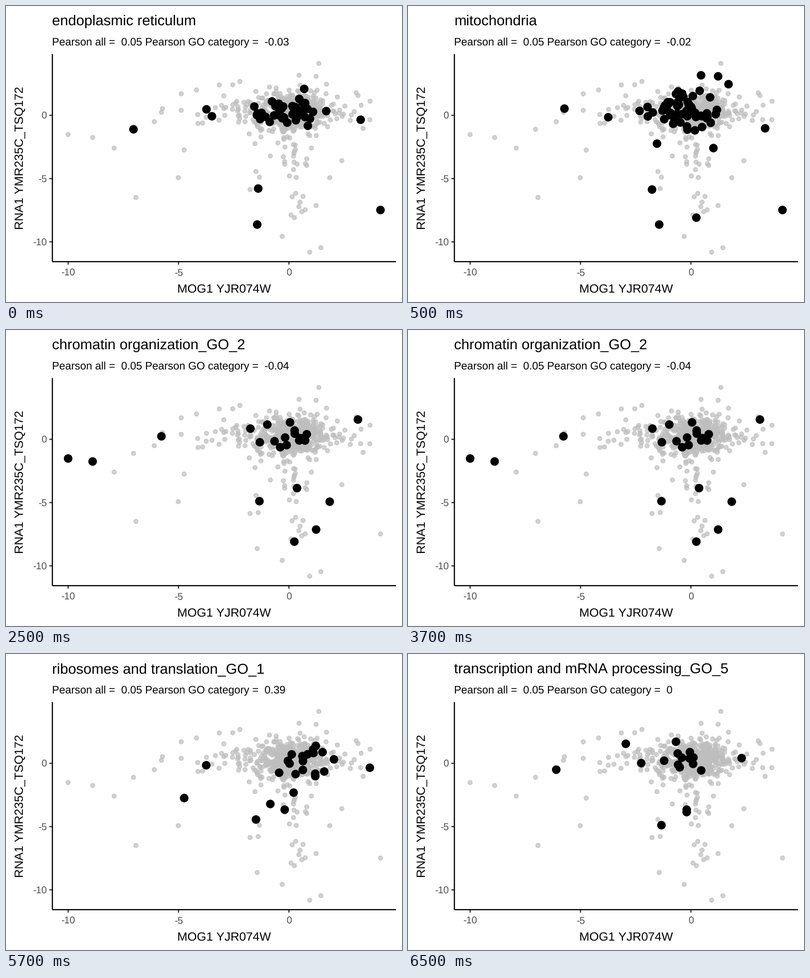
A matplotlib script that plays this animation: 800 px wide and 600 px high, repeating every 8 s.

```python
import numpy as np
import matplotlib.pyplot as plt
from matplotlib.animation import FuncAnimation

plt.rcParams.update({
    "font.family": "Liberation Sans",
    "text.hinting": "none",
    "text.kerning_factor": 6,  # in effect no kerning
})

DPI = 100
PX = 72 / DPI  # points per pixel
BASE = 24.5    # base font size in pixels
LINE = 2.37
LEFT, RIGHT, TOP, BOTTOM = 93.7, 787.8, 97.4, 518.2

rng = np.random.default_rng(11)


def blob(n, center, spread, reach=2.2):
    """n normally scattered points, none further out than reach deviations."""
    z = rng.normal(size=(4 * n, 2))
    z = z[np.hypot(*z.T) < reach][:n]
    return center + z * spread


def strip(n, x_range, center, spread):
    """n points spread evenly in x and normally in y."""
    return np.column_stack([rng.uniform(*x_range, n),
                            rng.normal(center, spread, n)])


def genes(key_points, *groups):
    return np.vstack([key_points, *groups])


# Lone genes are placed by hand (stage pixels), crowded ones scattered.
reticulum = genes(
    [(257.5, 250), (405, 209.5), (416, 223.5), (716.5, 230.5), (647, 213),
     (509.5, 370), (507.5, 443), (756.5, 413.5), (602.5, 168)],
    blob(42, (567, 216), (34, 15)))
mitochondria = genes(
    [(316, 208), (404.5, 225.5), (592, 140.5), (626.5, 142.5),
     (647.5, 158.5), (617, 288), (721.5, 248), (493, 372), (507.5, 443),
     (582.5, 429), (756.5, 413.5), (503, 279)],
    blob(58, (549, 213), (43, 24)))
chromatin = genes(
    [(125.5, 260.5), (175, 266.5), (314, 215.5), (711, 181.5), (588, 320.5),
     (512, 347), (654, 348), (626.5, 404.5), (582.5, 429)],
    blob(14, (560, 214), (50, 20)))
ribosomes = genes(
    [(360, 292), (404.5, 225.5), (735, 230.5), (534, 304), (563, 315.5),
     (505, 335.5), (581, 281), (662.5, 213.5)],
    blob(17, (597, 221), (32, 22)))
transcription = genes(
    [(299.5, 234.5), (440, 182), (674, 211), (563, 315.5), (563, 320.5),
     (512, 347)],
    blob(12, (560, 212), (42, 19)))

CATEGORIES = [
    ("endoplasmic reticulum", "-0.03", reticulum),
    ("mitochondria", "-0.02", mitochondria),
    ("chromatin organization_GO_2", "-0.04", chromatin),
    ("ribosomes and translation_GO_1", "0.39", ribosomes),
    ("transcription and mRNA processing_GO_5", "0", transcription),
]

highlighted = np.unique(np.vstack([c[2] for c in CATEGORIES]), axis=0)
all_genes = genes(
    [(218.5, 288), (262.5, 388), (348, 348), (354, 178), (354, 211.5),
     (472.5, 153), (632, 116.5), (707.5, 176), (735.5, 193), (678.5, 313.5),
     (558, 467), (636, 490), (613.5, 499)],
    highlighted,
    blob(170, (589, 214), (27, 17)),
    blob(190, (565, 214), (50, 27), 2.4),
    strip(18, (375, 475), 213, 19),
    strip(10, (655, 720), 214, 20),
    strip(12, (545, 610), 300, 14),
    strip(12, (570, 605), 390, 40),
)

fig = plt.figure(figsize=(8, 6), dpi=DPI, facecolor="white")
ax = fig.add_axes([0, 0, 1, 1])
ax.set(xlim=(0, 800), ylim=(600, 0))
ax.axis("off")


def label(x, y, text="", size=1.0, **style):
    return ax.text(x, y, text, fontsize=size * BASE * PX, va="baseline",
                   rotation_mode="anchor", **style)


def line(x, y, color):
    ax.plot(x, y, color=color, lw=LINE * PX, solid_capstyle="butt", snap=False)


def dots(xy, radius, color, **style):
    # One colour per dot keeps the dots off the whole-pixel grid.
    return ax.scatter(*xy.T, s=(2 * radius * PX) ** 2, color=[color] * len(xy),
                      linewidths=1.57 * PX, **style)


for value in (-10, -5, 0):
    x, y = 571.5 + 44.6 * value, 221.6 - 25.65 * value
    line((x, x), (BOTTOM, BOTTOM + 6.1), "#333333")
    line((LEFT - 6.1, LEFT), (y, y), "#333333")
    label(x, 547, str(value), 0.8, color="#4d4d4d", ha="center")
    label(82.5, y + 7.4, str(value), 0.8, color="#4d4d4d", ha="right")
line((LEFT, LEFT), (TOP, BOTTOM), "black")
line((LEFT, RIGHT), (BOTTOM, BOTTOM), "black")
label(441, 582, "MOG1 YJR074W", ha="center")
label(35, 308, "RNA1 YMR235C_TSQ172", ha="center", rotation=90)

dots(all_genes, 4.34, "#bebebe", alpha=0.7, zorder=3)
marks = [dots(xy, 7.9, "black", zorder=4) for _, _, xy in CATEGORIES]
title = label(93, 39, size=1.195)
subtitle = label(93, 80, size=0.887)


def update(frame):
    # The first category shows for one step, each later one for four.
    current = (frame + 3) // 4
    name, pearson, _ = CATEGORIES[current]
    title.set_text(name)
    subtitle.set_text(f"Pearson all =  0.05 Pearson GO category =  {pearson}")
    for i, mark in enumerate(marks):
        mark.set_visible(i == current)
    return title, subtitle, *marks


anim = FuncAnimation(fig, update, frames=16, interval=500, repeat=True)
plt.show()
```
